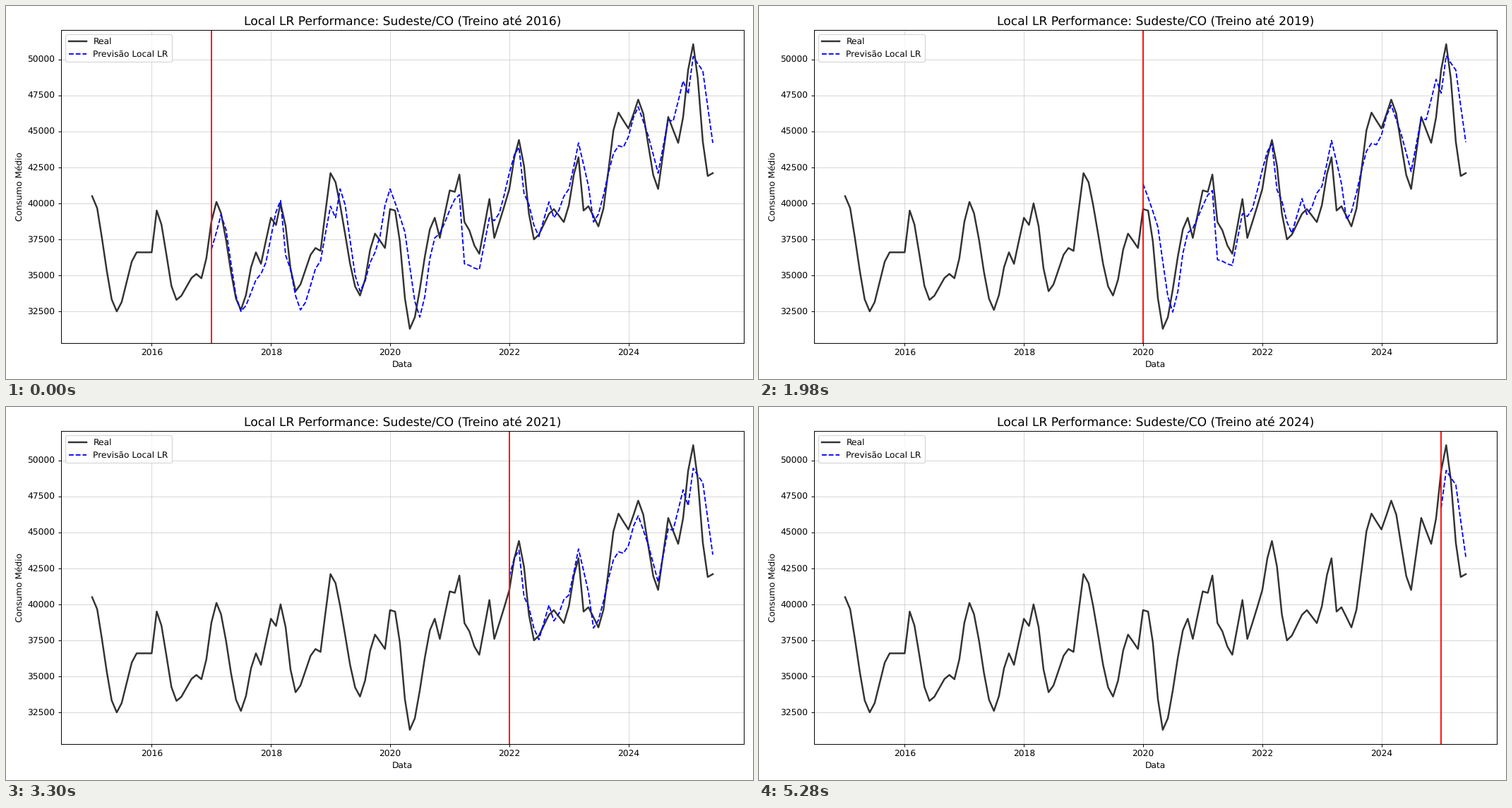
Recreate the animation shown at these times as a matplotlib script. Size 1058 px wide and 529 px high, loop 5940 ms.

```python
import numpy as np
import matplotlib.pyplot as plt
from matplotlib.animation import FuncAnimation

plt.rcParams.update({"font.family": "DejaVu Sans", "text.hinting": "none"})

W, H = 1058, 529
FIRST_CUT, LAST_CUT = 2016, 2024
dates = np.arange("2015-01", "2025-07", dtype="datetime64[M]").astype("datetime64[D]")
months = np.arange(len(dates))

# Turning points: month since January 2015, consumption in hundreds
REAL_TURNS = [
    (0, 405), (5, 325), (9, 366), (12, 366), (13, 395), (17, 333), (21, 351),
    (22, 348), (25, 401), (30, 326), (33, 366), (34, 358), (36, 390), (37, 385),
    (38, 400), (41, 339), (45, 369), (46, 367), (48, 421), (54, 336), (57, 379),
    (59, 369), (60, 396), (61, 395), (64, 312.9), (69, 390), (70, 376), (72, 409),
    (73, 408), (74, 420), (75, 387), (78, 365), (80, 403), (81, 376), (83, 398),
    (86, 444), (89, 375), (93, 396), (95, 387), (98, 432), (99, 395), (100, 398),
    (102, 384), (106, 463), (108, 452), (110, 472), (114, 410), (116, 460),
    (118, 442), (121, 510.5), (124, 419), (125, 421),
]
FORECAST_TURNS = [
    (24, 368), (26, 392), (30, 325), (34, 351), (38, 402), (39, 364), (42, 326),
    (46, 360), (48, 398), (49, 390), (50, 410), (54, 339), (57, 366), (60, 410),
    (62, 391), (66, 321), (69, 376), (74, 406), (75, 358), (78, 354), (80, 390),
    (81, 388), (86, 439), (87, 407), (90, 377), (92, 401), (93, 390), (96, 410),
    (98, 442), (100, 412), (101, 387), (106, 440), (107, 439), (110, 467),
    (112, 447), (114, 421), (116, 458), (117, 457), (119, 485), (120, 476),
    (121, 502), (123, 492), (125, 442),
]

# Each retrained model moves the forecast by an offset and a yearly drift
OFFSET = [0, 650, 550, 350, 0, -150, -100, -400, -900]
DRIFT = [0, 225, 45, -60, -200, -200, -300, -400, 0]


def wave(turns):
    """Monthly values eased from one turning point to the next."""
    at, level = np.array(turns).T
    k = np.clip(np.searchsorted(at, months, side="right") - 1, 0, len(at) - 2)
    u = np.clip((months - at[k]) / (at[k + 1] - at[k]), 0, 1)
    return 100 * (level[k] + (level[k + 1] - level[k]) * u * u * (3 - 2 * u))


real = wave(REAL_TURNS)
base = wave(FORECAST_TURNS)

fig, ax = plt.subplots(figsize=(12, 6), dpi=W / 12)
fig.subplots_adjust(left=78 / W, right=1045 / W, top=1 - 34 / H, bottom=1 - 478 / H)


def draw(i):
    cut = FIRST_CUT + i
    start = 12 * (cut + 1 - 2015)
    years = (months[start:] - start) // 12
    pred = base[start:] + OFFSET[i] + DRIFT[i] * years

    ax.clear()
    ax.plot(dates, real, color="black", alpha=0.8, lw=2, label="Real")
    ax.plot(dates[start:], pred, "--", color="blue", lw=1.5, label="Previsão Local LR")
    ax.axvline(dates[start], color="red", lw=1.5)
    ax.set_title(f"Local LR Performance: Sudeste/CO (Treino até {cut})", fontsize=14)
    ax.set_xlabel("Data")
    ax.set_ylabel("Consumo Médio")
    ax.grid(True, alpha=0.5)
    ax.legend(loc="upper left")
    return ax.lines


anim = FuncAnimation(fig, draw, frames=LAST_CUT - FIRST_CUT + 1, interval=660,
                     repeat=True, repeat_delay=0, blit=False)
plt.show()
```
